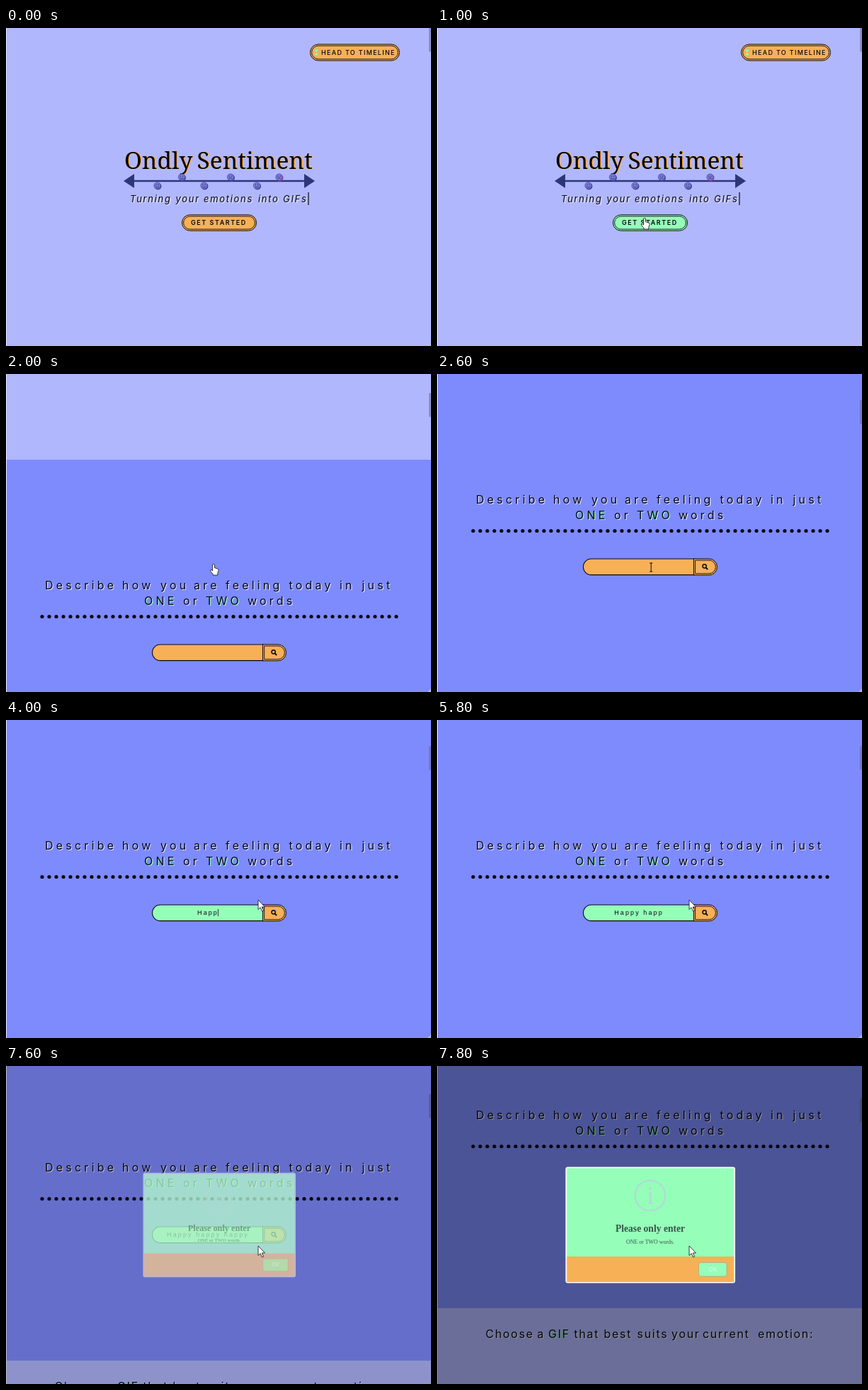
Animation of 600 by 449 pixels, one loop 8 s. Source, as an HTML page with a canvas:

```html
<!DOCTYPE html>
<html lang="en">
<head>
<meta charset="utf-8">
<title>Ondly Sentiment</title>
<style>
  html, body { margin: 0; width: 100%; height: 100%; overflow: hidden; background: #b0b7fc; }
  canvas { display: block; }
</style>
</head>
<body>
<canvas id="stage" width="600" height="449"></canvas>
<script>
const ctx = document.getElementById('stage').getContext('2d');
const LOOP = 8000, STEP = 200, SECTION = 450;
const LILAC = '#b0b7fc', BLUE = '#7e8bfd', ORANGE = '#f8b056', MINT = '#95ffb9', NAVY = '#2c3678', INK = '#080812';
const SANS = 'Inter, "Open Sans", sans-serif', SERIF = '"Liberation Serif", serif';
const PALE = 'rgba(255,255,255,.75)';

const ARROW = new Path2D('M0 0V13.5L3.2 10.7 5.5 16 7.6 15.1 5.3 10H9.5Z');
const HAND = new Path2D('M-1.4 1Q0-.9 1.4 1V5.6L6 7Q7.4 7.6 7 9.6L5.8 14V16H-1V14.4L-4.7 10Q-4.8 8.2-3 8.6L-1.4 10Z');
const PHRASE = 'Happy happy happy';
const KEY_TIMES = [3400, 3600, 3800, 4000, 4200, 4400, 4700, 5000, 5100, 5250,
  6000, 6100, 6300, 6400, 6600, 6700, 6850];

const clamp = v => Math.max(0, Math.min(1, v));
const swing = v => .5 - Math.cos(Math.PI * clamp(v)) / 2;
const mix = (a, b, v) => a + (b - a) * v;

function rect(x, y, w, h, color) {
  ctx.fillStyle = color;
  ctx.fillRect(x, y, w, h);
}

function shape(x, y, w, h, radius, fill, stroke, width = 1) {
  ctx.beginPath();
  ctx.roundRect(x, y, w, h, radius);
  if (fill) { ctx.fillStyle = fill; ctx.fill(); }
  if (stroke) { ctx.strokeStyle = stroke; ctx.lineWidth = width; ctx.stroke(); }
}

function circle(x, y, r, fill, stroke, width) {
  shape(x - r, y - r, 2 * r, 2 * r, r, fill, stroke, width);
}

function line(x1, y1, x2, y2, color, width) {
  ctx.beginPath();
  ctx.moveTo(x1, y1);
  ctx.lineTo(x2, y2);
  ctx.strokeStyle = color;
  ctx.lineWidth = width;
  ctx.stroke();
}

function text(str, x, y, font, { color = INK, spacing = 0, align = 'left', shadow, dx = 1.2, dy = 1.2 } = {}) {
  ctx.font = font;
  ctx.letterSpacing = spacing + 'px';
  ctx.textAlign = align;
  if (shadow) {
    ctx.fillStyle = shadow;
    ctx.fillText(str, x + dx, y + dy);
  }
  ctx.fillStyle = color;
  ctx.fillText(str, x, y);
}

// Words as [text, x, shadow?] on a common baseline.
function words(list, y, font, options) {
  for (const [str, x, shadow] of list)
    text(str, x, y, font, { ...options, shadow: shadow || options.shadow });
}

function doubleBorder(x, y, w, h, radii, fill) {
  shape(x + .5, y + .5, w - 1, h - 1, radii, fill, INK, 1);
  shape(x + 2.6, y + 2.6, w - 5.2, h - 5.2, radii.map(r => Math.max(0, r - 2)), null, INK, .9);
}

function face(x, y, i) {
  circle(x + 1, y + 1, 5, i === 5 ? '#a0409a' : '#464a96');
  circle(x, y, 4.6, '#7b7ad6', '#4a4d9c', .8);
  circle(x - 1.7, y - 1.2, .7, NAVY);
  circle(x + 1.7, y - 1.2, .7, NAVY);
  ctx.beginPath();
  if (i > 2 && i % 2) ctx.arc(x, y + 3, 2, Math.PI * 1.1, Math.PI * 1.9);
  else ctx.arc(x, y + .4, 2.2, .2, Math.PI - .2);
  ctx.strokeStyle = NAVY;
  ctx.lineWidth = .9;
  ctx.stroke();
}

function hourglass(x, y) {
  ctx.beginPath();
  for (const [px, py] of [[-3, -4.5], [3, -4.5], [-3, 4.5], [3, 4.5]]) ctx.lineTo(x + px, y + py);
  ctx.closePath();
  ctx.fillStyle = MINT;
  ctx.fill();
  line(x - 3, y - 4.5, x + 3, y - 4.5, '#6fd6a0', 1);
  line(x - 3, y + 4.5, x + 3, y + 4.5, '#6fd6a0', 1);
}

function drawIntro(t) {
  rect(0, 0, 600, SECTION, LILAC);
  doubleBorder(429, 22.5, 127, 24, [12], ORANGE);
  hourglass(438, 34.5);
  text('HEAD TO TIMELINE', 445, 38, `500 9px ${SANS}`, { spacing: 1.3 });

  words([['Ondly', 167], ['Sentiment', 269.5]], 198.5, '33.5px "Noto Serif", serif',
    { color: '#000', shadow: '#ffab42', dx: 1.6, dy: .8 });

  line(180, 216, 422, 216, NAVY, 2.4);
  for (const [tip, base] of [[166, 181], [436, 421]]) {
    ctx.beginPath();
    ctx.moveTo(tip, 216);
    ctx.lineTo(base, 206);
    ctx.lineTo(base, 226);
    ctx.fillStyle = NAVY;
    ctx.fill();
  }
  [213.5, 248, 279.5, 317, 354, 385.5].forEach((x, i) => face(x, i % 2 ? 210.5 : 222.5, i));

  words([['Turning', 175], ['your', 239.5], ['emotions', 279], ['into', 356], ['GIFs', 391]], 245.5,
    `italic 13px ${SANS}`, { spacing: 1.7, shadow: 'rgba(255,255,255,.65)', dx: 1.5, dy: 1.5 });
  if (t % 750 < 375) line(427, 232, 427, 250, INK, 1.2);

  doubleBorder(248, 263.3, 106, 23.4, [11.7], t >= 1000 ? MINT : ORANGE);
  text('GET STARTED', 261, 278.3, `600 9px ${SANS}`, { spacing: 1.55 });
}

function drawInput(t) {
  const focused = t >= 2800;
  shape(206.5, 711, 157, 22.6, [11.3, 0, 0, 11.3], focused ? MINT : ORANGE, INK, 1.1);
  doubleBorder(362, 710.4, 34, 24, [0, 12, 12, 0], ORANGE);
  circle(377.6, 721.3, 2.6, null, INK, 1.5);
  line(379.5, 723.3, 382.2, 726, INK, 1.8);
  if (!focused) return;

  const typed = KEY_TIMES.filter(k => k <= t).length;
  const lastKey = typed ? KEY_TIMES[typed - 1] : 2800;
  text(PHRASE.slice(0, typed), 285, 725.3, '9px "Liberation Sans", sans-serif', { spacing: 2.1, align: 'center' });
  const width = typed ? ctx.measureText(PHRASE.slice(0, typed)).width : 0;
  if ((t - lastKey) % 1000 < 500) line(284.5 + width / 2, 717, 284.5 + width / 2, 727, INK, .8);
}

function drawQuestion(t) {
  rect(0, SECTION, 600, SECTION, BLUE);
  const font = `16px ${SANS}`, style = { spacing: 4.2, shadow: PALE };
  words([['Describe', 55], ['how', 164], ['you', 218], ['are', 265], ['feeling', 310],
    ['today', 399.5], ['in', 471], ['just', 502.5]], 632.5, font, style);
  words([['ONE', 195, MINT], ['or', 250], ['TWO', 282, MINT], ['words', 341]], 655, font, style);
  ctx.lineCap = 'round';
  ctx.setLineDash([0, 10]);
  line(51, 671.5, 552, 671.5, INK, 5.2);
  ctx.setLineDash([]);
  ctx.lineCap = 'butt';
  drawInput(t);
}

function drawChoice() {
  rect(0, 2 * SECTION, 600, SECTION, LILAC);
  words([['Choose', 68.5], ['a', 141.5], ['GIF', 157, MINT], ['that', 193.5], ['best', 235.5], ['suits', 282.5],
    ['your', 331], ['current', 375], ['emotion:', 453]], 941.5, `16px ${SANS}`, { spacing: 1.7, shadow: PALE });
}

function drawDialog(progress) {
  if (!progress) return;
  rect(0, 0, 600, 449, `rgba(0,0,0,${.4 * progress})`);
  const scale = mix(.8, 1, progress);
  ctx.save();
  ctx.globalAlpha = progress;
  ctx.translate(301, 224.5);
  ctx.scale(scale, scale);
  ctx.translate(-301, -224.5);
  shape(181.5, 142.5, 239.5, 164, 3, '#fff');
  rect(183.3, 144.3, 236, 125, MINT);
  rect(183.3, 269, 236, 36, ORANGE);
  const tint = '#b6d6da';
  circle(301, 183, 21.3, null, tint, 2.2);
  text('i', 301, 194.5, `35px ${SERIF}`, { color: tint, align: 'center' });
  text('Please only enter', 301, 233.5, `bold 13.6px ${SERIF}`, { color: '#38544a', align: 'center' });
  text('ONE or TWO words.', 301, 251, `7.9px ${SERIF}`, { color: '#38544a', align: 'center' });
  shape(369.5, 277.5, 39.5, 19.5, 3, MINT, '#a5a98c', .8);
  text('OK', 389.5, 290, `600 8px ${SANS}`, { color: '#dcf5ee', align: 'center' });
  ctx.restore();
}

function drawPointer(t) {
  if (t < 200) return;
  const arrive = Math.sin(clamp((t - 200) / 800) * Math.PI / 2);
  const leave = swing((t - 2400) / 800);
  const x = mix(mix(13, 293, arrive), 356, leave);
  const y = mix(mix(191, 268, arrive), 254, leave);
  if (t > 2400 && t < 3200) {
    line(x, y + 1, x, y + 13, INK, 1);
    line(x - 2, y + 1, x + 2, y + 1, INK, 1);
    line(x - 2, y + 13, x + 2, y + 13, INK, 1);
    return;
  }
  const path = t >= 1000 && t <= 2400 ? HAND : ARROW;
  ctx.save();
  ctx.translate(x, y);
  ctx.fillStyle = '#fff';
  ctx.strokeStyle = '#222';
  ctx.lineWidth = .9;
  ctx.fill(path);
  ctx.stroke(path);
  ctx.restore();
}

function draw(now) {
  const t = Math.floor(now % LOOP / STEP) * STEP;
  const scroll = Math.round(SECTION * (swing((t - 1445) / 850) + swing((t - 7360) / 1350)));

  ctx.save();
  ctx.translate(0, -scroll);
  drawIntro(t);
  drawQuestion(t);
  drawChoice();
  ctx.restore();

  rect(0, 0, 1, 449, '#e2e4fd');
  rect(597, scroll * .082, 3, 33.5, 'rgba(100,100,140,.5)');
  ctx.beginPath();
  ctx.moveTo(600, 444);
  ctx.lineTo(600, 449);
  ctx.lineTo(595, 449);
  ctx.fillStyle = 'rgba(190,190,210,.8)';
  ctx.fill();

  drawDialog(clamp((t - 7400) / 400));
  drawPointer(t);
}

const start = performance.now();
function tick() {
  draw(performance.now() - start);
  requestAnimationFrame(tick);
}
tick();
</script>
</body>
</html>
```
